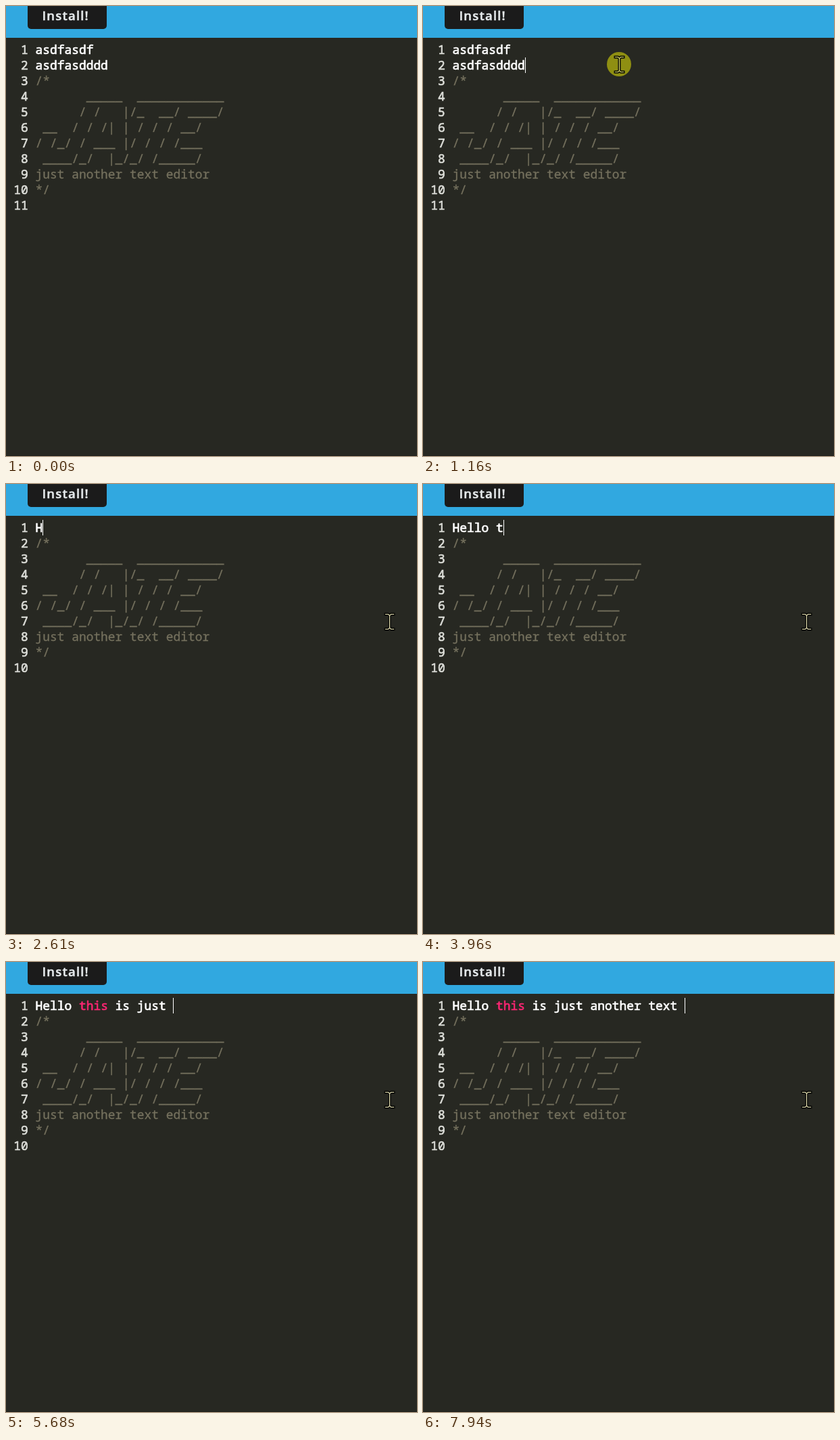
Recreate the animation shown at these times as an HTML page with a canvas. Size 608 px wide and 665 px high, loop 8 s.

```html
<!DOCTYPE html>
<html lang="en">
<head>
<meta charset="utf-8">
<title>Text editor</title>
<style>
html, body { margin: 0; width: 608px; height: 665px; overflow: hidden; background: #272822; }
canvas { display: block; }
</style>
</head>
<body>
<canvas id="stage" width="608" height="665"></canvas>
<script>
const ctx = document.getElementById('stage').getContext('2d');
const LOOP = 8000, CHAR = 10.74, LEFT = 43.5, TOP = 53, ROW = 23;
const MONO = '17.9px "Noto Sans Mono", "DejaVu Sans Mono", monospace';
const WHITE = '#ffffff', COMMENT = '#75715e', PINK = '#f92672';

const before = ['asdfasdf', 'asdfasdddd'];
const banner = [
  '/*',
  '       _____  ____________',
  '      / /   |/_  __/ ____/',
  ' __  / / /| | / / / __/',
  '/ /_/ / ___ |/ / / /___',
  ' ____/_/  |_/_/ /_____/',
  'just another text editor',
  '*/'
];
const typed = 'Hello this is just another text ';
const keyTimes = [
  2610, 2880, 2970, 3150, 3330, 3510, 3960, 4050, 4140, 4230, 4410, 4500, 4680, 4770, 5230, 5410,
  5500, 5590, 5680, 6130, 6220, 6310, 6410, 6590, 6680, 6680, 6770, 7130, 7220, 7490, 7670, 7940
];
const DOWN = 1070, DRAG = 1250, UP = 1610;

// Pointer waypoints: time, x, y
const path = [
  [260, 495, 609], [710, 285, 95], [800, 269, 77], [980, 290, 86],
  [1160, 290, 86], [1430, 3, 26], [1610, 3, 26], [1880, 567, 203]
];

function pointerAt(time) {
  const t = 260 + Math.floor((time - 260) / 90) * 90; // moves in 90 ms steps
  const i = path.findIndex(p => p[0] > t);
  if (i < 0) return path[path.length - 1].slice(1);
  const [t0, x0, y0] = path[i - 1], [t1, x1, y1] = path[i];
  const u = (t - t0) / (t1 - t0), e = u * u * (3 - 2 * u);
  return [x0 + (x1 - x0) * e, y0 + (y1 - y0) * e];
}

function rect(color, x, y, w, h) {
  ctx.fillStyle = color;
  ctx.fillRect(x, y, w, h);
}

// A thin outline gives weights between regular and bold
function label(text, x, y, color, font, outline) {
  ctx.font = font;
  ctx.fillStyle = ctx.strokeStyle = color;
  ctx.lineWidth = outline;
  ctx.fillText(text, x, y);
  ctx.strokeText(text, x, y);
}

function write(text, row, color, col = 0, outline = 0.7) {
  label(text, LEFT + col * CHAR, TOP + 18 + row * ROW, color, MONO, outline);
}

function header() {
  rect('#31a8e0', 0, 0, 608, 47);
  ctx.fillStyle = '#1b1b1b';
  ctx.beginPath();
  ctx.roundRect(32, -10, 117, 44, 5);
  ctx.fill();
  ctx.letterSpacing = '1.2px';
  label('Install!', 53.5, 21, '#e6eaec', '600 18.5px "Open Sans", "Noto Sans", sans-serif', 0.5);
  ctx.letterSpacing = '0px';
}

function caret(col, row) {
  rect(WHITE, Math.floor(43.9 + col * CHAR), TOP + row * ROW, 1, ROW);
}

function selection(x, y) {
  const row = y > TOP + ROW ? 1 : 0;
  const col = Math.max(0, Math.min(before[row].length, Math.round((x - LEFT) / CHAR)));
  const start = Math.round(LEFT + col * CHAR), end = 151;
  if (row) return rect('#49483e', start, TOP + ROW, end - start, ROW);
  rect('#49483e', start, TOP, 608 - start, ROW);
  rect('#49483e', 44, TOP + ROW, end - 44, ROW);
}

function pointer(x, y, pressed) {
  if (pressed) {
    ctx.fillStyle = '#8f8f12';
    ctx.beginPath();
    ctx.arc(x, y, 18, 0, 7);
    ctx.fill();
  }
  const beam = new Path2D('M-6 -11H-2L0 -9L2 -11H6M0 -9V9M-6 11H-2L0 9L2 11H6');
  ctx.save();
  ctx.translate(Math.round(x) + 0.5, Math.round(y) + 0.5);
  ctx.lineCap = 'square';
  for (const [color, width] of [['#060604', 4], [pressed ? '#dcdc68' : '#e6e2b4', 1.2]]) {
    ctx.strokeStyle = color;
    ctx.lineWidth = width;
    ctx.stroke(beam);
  }
  ctx.restore();
}

function draw(t) {
  const count = keyTimes.filter(k => k <= t).length;
  const text = typed.slice(0, count);
  const lines = count ? [text] : before;
  const [x, y] = t >= 260 ? pointerAt(t) : [];

  rect('#272822', 0, 0, 608, 665);
  rect('#1e1f1a', 0, 664, 608, 1);
  header();
  if (t >= DRAG && !count) selection(...(t < UP ? [x, y] : [0, 0]));

  if (count >= 10) {
    write('Hello', 0, WHITE);
    write('this', 0, PINK, 6);
    write(text.slice(10), 0, WHITE, 10);
  } else {
    lines.forEach((line, i) => write(line, i, WHITE));
  }
  banner.forEach((line, i) => write(line, lines.length + i, COMMENT, 0, 0.3));
  for (let n = 1; n <= lines.length + banner.length + 1; n++) {
    write(String(n).padStart(2), n - 1, '#dcddd8', -3);
  }

  if (count) caret(count, 0);
  else if (t >= DOWN && t < DRAG) caret(10, 1);
  if (t >= 260) pointer(x, y, t >= DOWN && t < UP);
}

const began = performance.now();
function frame() {
  draw((performance.now() - began) % LOOP);
  requestAnimationFrame(frame);
}
frame();
</script>
</body>
</html>
```
